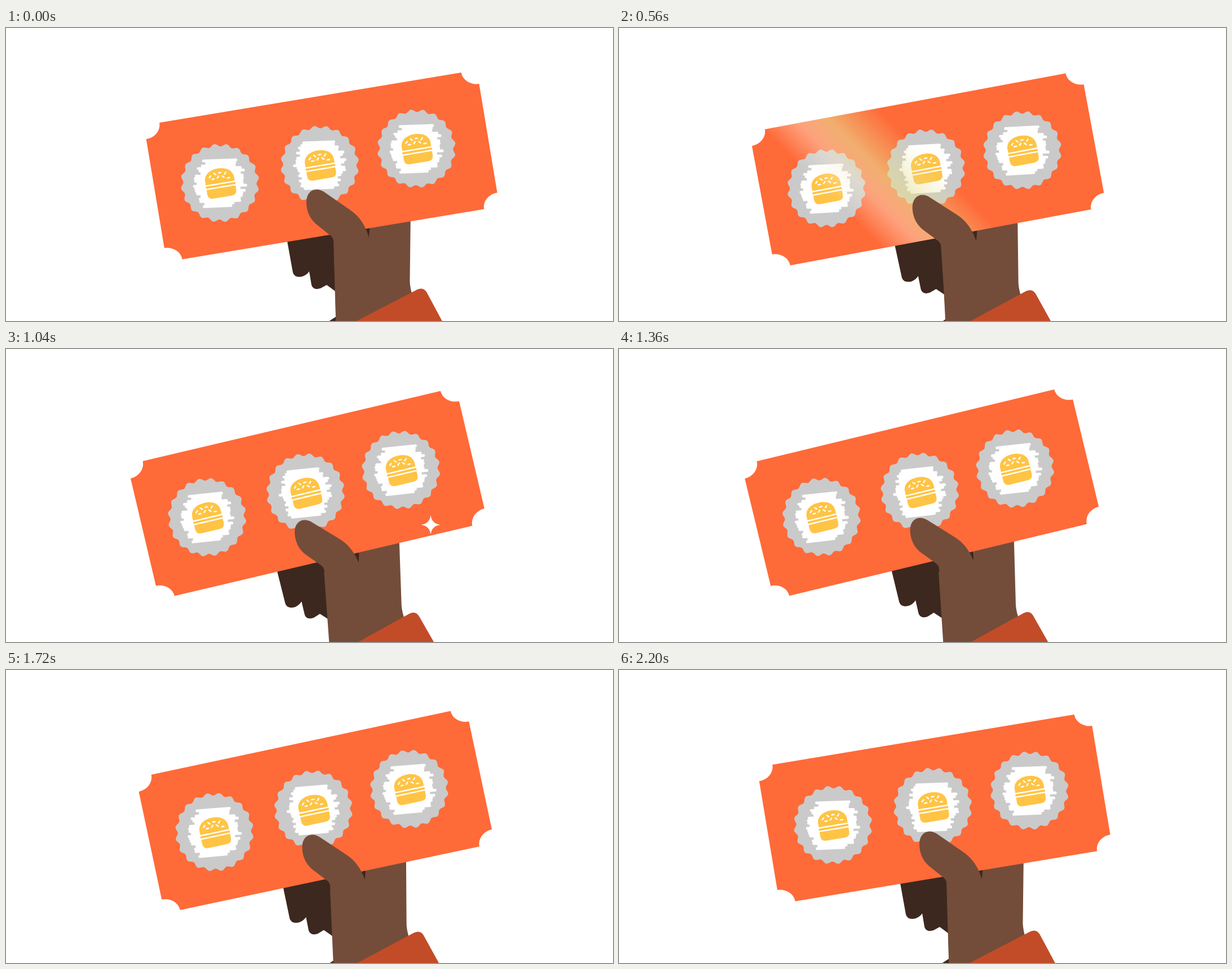
Write an HTML page with a canvas that moves like this. It is 1077 px wide and 520 px high and loops after 2.24 s.

```html
<!DOCTYPE html>
<html lang="en">
<head>
<meta charset="utf-8">
<title>Scratch ticket</title>
<style>
  html, body { margin: 0; width: 100%; height: 100%; overflow: hidden; background: #fff; }
  canvas { display: block; }
</style>
</head>
<body>
<canvas id="stage" width="1077" height="520"></canvas>
<script>
const ctx = document.getElementById('stage').getContext('2d');
const LOOP = 2240, STEP = 40, SWING = 2200;
const DEG = Math.PI / 180;
const ORANGE = '#ff6a39', SKIN = '#734d3a', DARK = '#3c281e', SLEEVE = '#c34c28',
      GREY = '#cacaca', YELLOW = '#ffc445';

const fingers = new Path2D('M496 362L509 434Q512 444 526 441Q534 438 538 432L542 456Q545 466 558 462L569 456L584 467L646 480V340Z');
const wrist = new Path2D('M649 325L643.5 373L582 385L587 580H740L722 478Q717 462 716.5 450L718 325Z');
const thumb = new Path2D('M533 309C533 288 550 280 566 292L612 324Q635 340 644 372L641 580H587L581 377Q580 371 574 367L549 347Q533 332 533 309Z');
const cuff = new Path2D('M555 532L600 503V540Z');
const sleeve = new Path2D('M545 560L730 464Q741 459 747 470L806 580H545Z');
const burger = new Path2D('M-26 0V-6C-26 -20 -13 -26 0 -26S26 -20 26 -6V0ZM-26.5 2.4H26.5V6.2H-26.5ZM-26 8.6H26V16Q26 25.5 16.5 25.5H-16.5Q-26 25.5 -26 16Z');
const star = new Path2D('M0 -17Q2 -2 17 0Q2 2 0 17Q-2 2 -17 0Q-2 -2 0 -17Z');

function makeTicket(left, top, right, bottom) {
  const path = new Path2D(), rx = 28, ry = 25;
  path.ellipse(left, top, rx, ry, 0, 90 * DEG, 0, true);
  path.ellipse(right, top, rx, ry, 0, 180 * DEG, 90 * DEG, true);
  path.ellipse(right, bottom, rx, ry, 0, 270 * DEG, 180 * DEG, true);
  path.ellipse(left, bottom, rx, ry, 0, 0, 270 * DEG, true);
  path.closePath();
  return path;
}

function makeScallop(bumps) {
  const path = new Path2D();
  for (let a = 0; a < 360; a += 2) {
    const r = 67.3 + 2.4 * Math.cos(bumps * a * DEG);
    path.lineTo(r * Math.sin((a + 1.3) * DEG), -r * Math.cos((a + 1.3) * DEG));
  }
  path.closePath();
  return path;
}

// Ragged horizontal strokes that fill a rough disc
function makeScratch(seed) {
  const random = () => (seed = seed * 16807 % 2147483647) / 2147483647;
  const path = new Path2D();
  for (let y = -40; y <= 41; y += 4.5) {
    const half = 41 * Math.sqrt(1 - (y / 50) ** 2);
    path.moveTo(-half + 12 * random() - 5, y + 1);
    path.lineTo(half + 12 * random() - 7, y - 1);
  }
  return path;
}

const ticket = makeTicket(-296.3, -120.6, 302.5, 125.2);
const scallop = makeScallop(20);
const sideScratch = makeScratch(4211), middleScratch = makeScratch(9173);

function fill(path, color) {
  ctx.fillStyle = color;
  ctx.fill(path);
}

function placed(x, y, angle, draw) {
  ctx.save();
  ctx.translate(x, y);
  ctx.rotate(angle);
  draw();
  ctx.restore();
}

function fillTurned(path, color, px, py, angle) {
  placed(px, py, -angle, () => {
    ctx.translate(-px, -py);
    fill(path, color);
  });
}

// Eased swing from 0 to 1 at `peak`, then back
function swing(t, peak) {
  const x = t < peak ? t / peak : (SWING - t) / (SWING - peak);
  return x * x * (3 - 2 * x);
}

function drawBadge(x, y, scratch) {
  placed(x, y, 0, () => {
    fill(scallop, GREY);
    placed(0, 0, 9.45 * DEG, () => {
      ctx.strokeStyle = '#fff';
      ctx.lineWidth = 5;
      ctx.lineCap = 'round';
      ctx.stroke(scratch);
    });
    ctx.translate(.5, 0);
    fill(burger, YELLOW);
    for (let i = 0; i < 8; i++) {
      const sx = 4.6 * (i - 3.5);
      const sy = -18 + 7 * (i % 2) + sx * sx / 60;
      placed(sx, sy, (i % 3 - 1) * 45 * DEG, () => {
        ctx.fillStyle = '#fff';
        ctx.beginPath();
        ctx.ellipse(0, 0, 3.4, 1.3, 0, 0, 360 * DEG);
        ctx.fill();
      });
    }
  });
}

// Diagonal band of light sweeping to the upper right
function drawShine(t) {
  const centre = 645 + (t - 720) * 2.8, half = 120;
  const a = (centre - half) / 2, b = (centre + half) / 2;
  const light = ctx.createLinearGradient(a, -a, b, -b);
  light.addColorStop(0, 'rgba(255,245,235,0)');
  light.addColorStop(.3, 'rgba(250,238,215,.42)');
  light.addColorStop(.55, 'rgba(230,221,145,.6)');
  light.addColorStop(1, 'rgba(230,221,145,0)');
  ctx.clip(ticket);
  ctx.setTransform(1, 0, 0, 1, 0, 0);
  ctx.fillStyle = light;
  ctx.fillRect(0, 0, 1077, 520);
}

function drawTicket(t) {
  const wave = lag => Math.cos((t / SWING * 360 - lag) * DEG);
  const x = 556.8 - 12.9 * (1 - wave(5));
  const y = 243 + 6 * (1 - wave(0));
  placed(x, y, (-11.45 + 2.22 * wave(26)) * DEG, () => {
    fill(ticket, ORANGE);
    drawBadge(-180, 2.5, sideScratch);
    drawBadge(0, 0, middleScratch);
    drawBadge(174, -.4, sideScratch);
    if (t > 360 && t < 840) drawShine(t);
  });
}

function drawStar(t) {
  if (t <= 720 || t >= 1365) return;
  const size = Math.sin((t - 720) / 645 * Math.PI);
  placed(753.5, 312 + Math.max(0, t - 1040) / 40, 0, () => {
    ctx.scale(size, size);
    fill(star, '#fff');
  });
}

function draw(t) {
  const arm = swing(t, 1080);
  ctx.fillStyle = '#fff';
  ctx.fillRect(0, 0, 1077, 520);
  fillTurned(fingers, DARK, 770, 642, .068 * swing(t, 1100));
  fillTurned(cuff, DARK, 925, 980, .027 * arm);
  fillTurned(wrist, SKIN, 839, 767, .047 * arm);
  drawTicket(t);
  drawStar(t);
  fillTurned(thumb, SKIN, 810, 646, .0635 * swing(t, 1000));
  fillTurned(sleeve, SLEEVE, 925, 980, .027 * arm);
}

const start = performance.now();
function frame() {
  const t = (performance.now() - start) % LOOP;
  draw(Math.floor(t / STEP) * STEP);
  requestAnimationFrame(frame);
}
frame();
</script>
</body>
</html>
```
